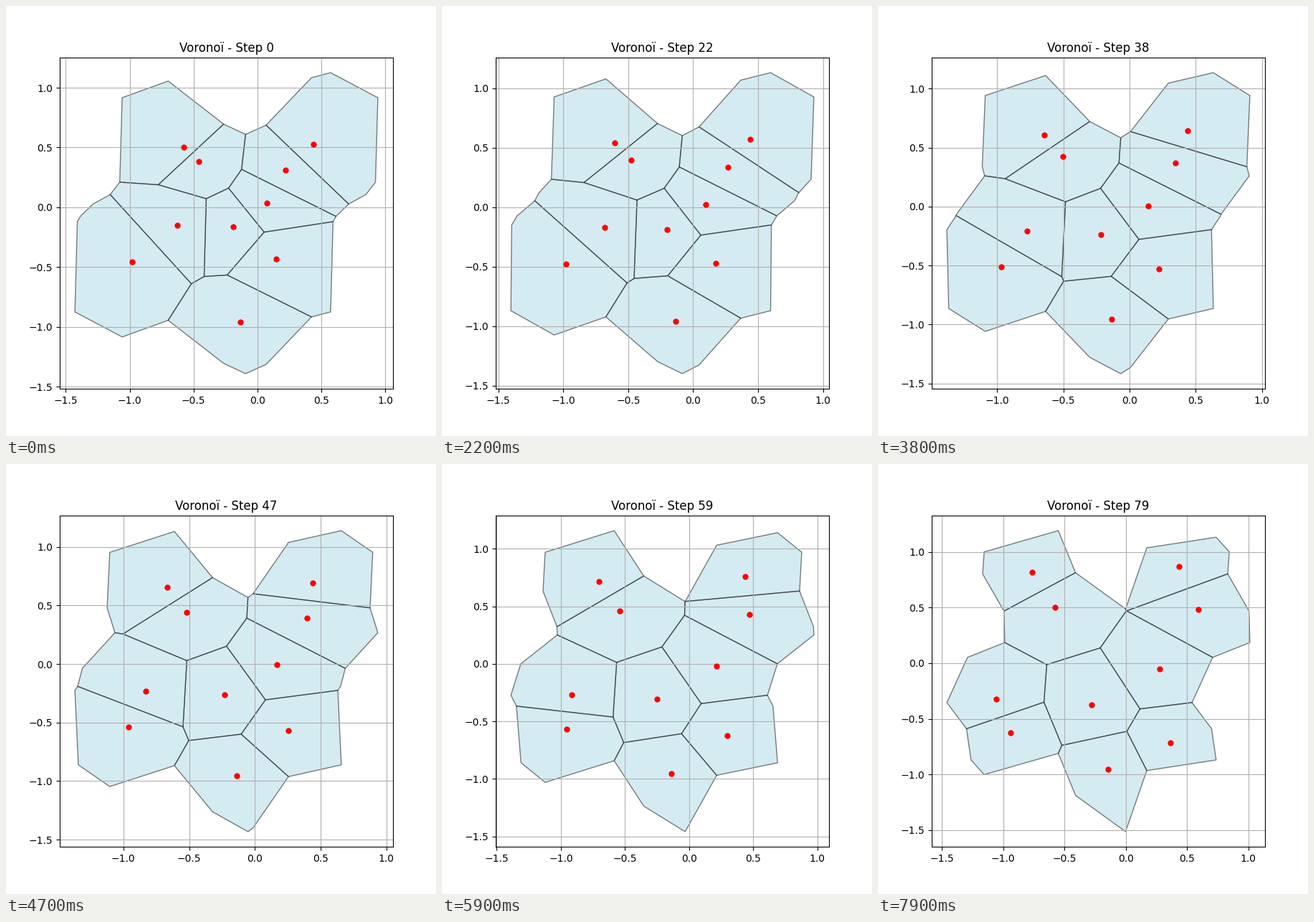
A matplotlib script that plays this animation: 600x600 px, repeating every 8 s.

```python
import numpy as np
import matplotlib.pyplot as plt
from matplotlib.animation import FuncAnimation

FRAMES = 80
PERIOD = 2.0  # the plane wraps around in both directions

# Each site glides straight from its start to its end.
START = np.array([
    (-.579, .502), (-.461, .383), (.440, .528), (.2185, .311), (.072, .036),
    (-.188, -.161), (-.626, -.150), (-.983, -.454), (.148, -.432),
    (-.1325, -.960)])
END = np.array([
    (-.766, .815), (-.579, .4985), (.436, .866), (.5915, .480), (.2765, -.049),
    (-.278, -.377), (-1.056, -.325), (-.942, -.627), (.366, -.718),
    (-.1415, -.952)])

SHIFTS = PERIOD * np.array([(i, j) for i in (-1, 0, 1) for j in (-1, 0, 1)])


def ease(s):
    """Start at rest, speed up, then cruise."""
    r = 1 - s
    return s**2 * (1 + 0.78 * r + 0.25 * r**2)


def sites_at(step):
    return START + (END - START) * ease(step / (FRAMES - 1))


def clip(poly, normal, limit):
    """Keep the part of a convex polygon where p . normal <= limit."""
    nx, ny = normal
    out = []
    prev = poly[-1]
    d_prev = prev[0] * nx + prev[1] * ny - limit
    for cur in poly:
        d = cur[0] * nx + cur[1] * ny - limit
        if (d > 0) != (d_prev > 0):
            t = d_prev / (d_prev - d)
            out.append((prev[0] + t * (cur[0] - prev[0]),
                        prev[1] + t * (cur[1] - prev[1])))
        if d <= 0:
            out.append(cur)
        prev, d_prev = cur, d
    return out


def cell(site, images):
    """Voronoi cell of a site among all periodic images."""
    rel = images - site
    dist = np.hypot(rel[:, 0], rel[:, 1])
    poly = [(-2, -2), (2, -2), (2, 2), (-2, 2)]
    for k in np.argsort(dist)[1:]:  # the nearest image is the site itself
        if dist[k] > 2 * max(np.hypot(x, y) for x, y in poly):
            break
        poly = clip(poly, rel[k].tolist(), float(dist[k] ** 2 / 2))
    return np.array(poly) + site


fig, ax = plt.subplots(figsize=(6, 6), dpi=100)


def draw(step):
    ax.clear()
    sites = sites_at(step)
    images = (sites[:, None] + SHIFTS).reshape(-1, 2)
    for site in sites:
        ax.fill(*cell(site, images).T, facecolor="lightblue",
                edgecolor="black", alpha=0.5)
    ax.plot(*sites.T, "ro", markersize=5)
    ax.set_title(f"Voronoï - Step {step}")
    ax.grid(True)


anim = FuncAnimation(fig, draw, frames=FRAMES, interval=100,
                     repeat=True, repeat_delay=0)
plt.show()
```
